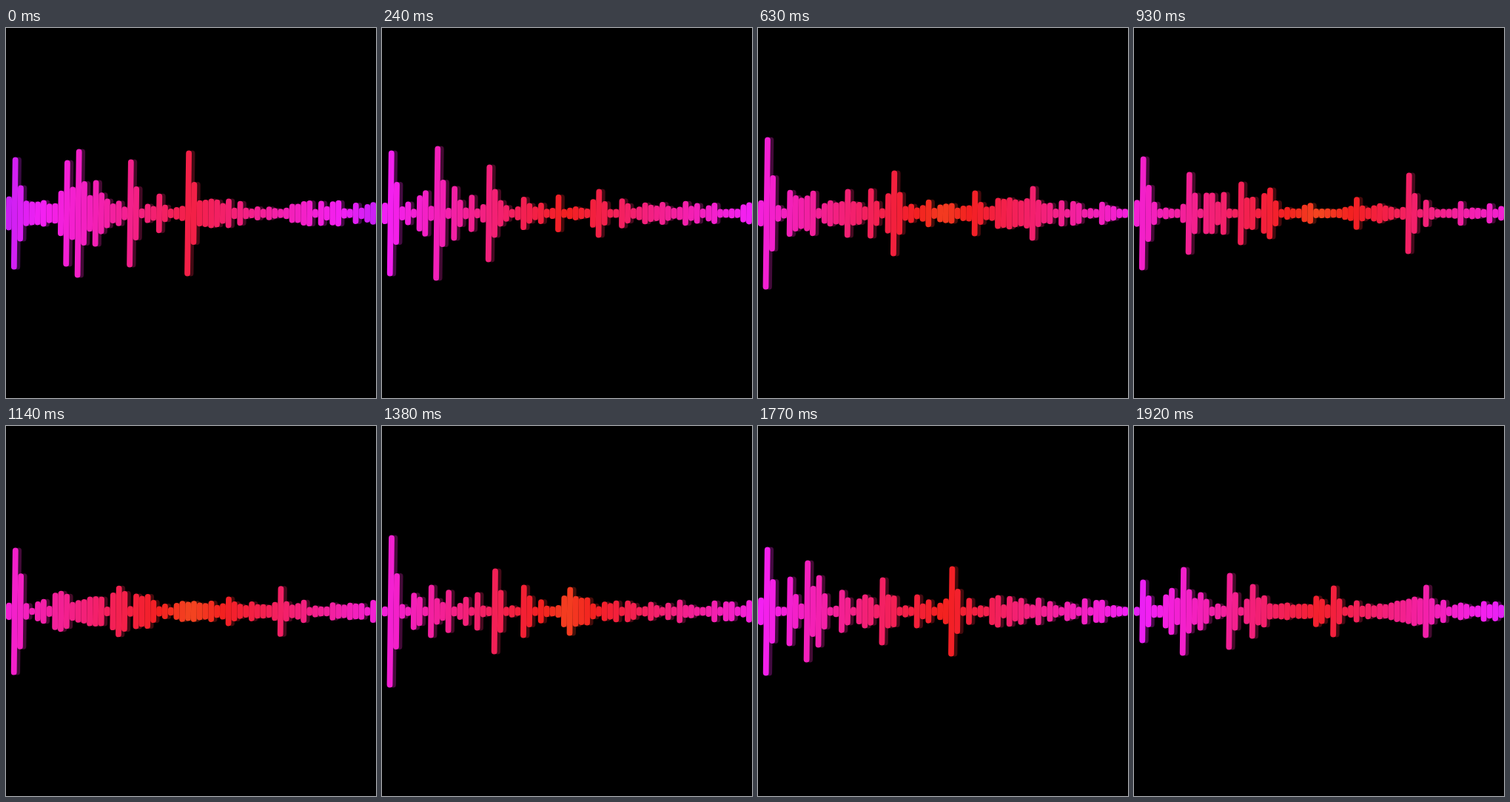
Write an HTML page with a canvas that moves like this. It is 500x500 px and loops after 1950 ms.

```html
<!DOCTYPE html>
<html lang="en">
<head>
<meta charset="utf-8">
<title>Sound bars</title>
<style>
  html, body { margin: 0; width: 100%; height: 100%; overflow: hidden; background: #000; }
  canvas { display: block; width: 100vw; height: 100vh; }
</style>
</head>
<body>
<canvas width="500" height="500"></canvas>
<script>
const ctx = document.querySelector('canvas').getContext('2d');
const LOOP = 1950, STEP = 30, COUNT = 64, PITCH = 500 / COUNT, WIDTH = 7.8, MIDDLE = 250.5;

// Loudest bars at a few moments, as bar: half-height
const keys = [
  { time: 0, peaks: { 1: 76, 10: 72, 12: 87, 15: 45, 21: 73, 31: 85 } },
  { time: 240, peaks: { 1: 85, 9: 91, 12: 37, 18: 66, 37: 33 } },
  { time: 630, peaks: { 1: 103, 15: 33, 19: 34, 23: 58, 37: 31, 47: 37 } },
  { time: 930, peaks: { 1: 77, 9: 56, 18: 43, 23: 35, 47: 55 } },
  { time: 1380, peaks: { 1: 103, 8: 36, 19: 58, 24: 36, 32: 33 } },
  { time: 1770, peaks: { 1: 87, 5: 47, 8: 69, 10: 49, 21: 46, 33: 61 } },
  { time: 1920, peaks: { 1: 43, 8: 60, 16: 52, 20: 37, 34: 35, 50: 36 } }
];

const mix = (a, b, u) => a + (b - a) * u;

function random(i, j) {
  const v = Math.sin(i * 127.1 + j * 311.7 + 7) * 43758.5453;
  return v - Math.floor(v);
}

function noise(i, t) {
  const j = Math.floor(t);
  return mix(random(i, j), random(i, j + 1), t - j) * 2 - 1;
}

// A peak carries half its height over to the next bar; the rest is
// a seeded murmur that gets quieter to the right.
function level(i, k) {
  const { peaks } = keys[k];
  const murmur = 6 + random(i, k) ** 2 * (28 - 0.28 * i);
  return peaks[i] ?? Math.max(murmur, (peaks[i - 1] ?? 0) / 2);
}

function bar(x, h, color) {
  const len = Math.max(h - WIDTH / 2, 0.1), lean = len * 0.0125;
  ctx.strokeStyle = color;
  ctx.beginPath();
  ctx.moveTo(x + lean, MIDDLE - len);
  ctx.lineTo(x - lean, MIDDLE + len);
  ctx.stroke();
}

function draw(now) {
  const t = Math.floor((now % LOOP) / STEP) * STEP;
  const k = Math.min(keys.findLastIndex(key => key.time <= t), keys.length - 2);
  const u = (t - keys[k].time) / (keys[k + 1].time - keys[k].time);
  const sway = 0.4 * Math.sin(Math.PI * u);
  const warmth = 350 + 21 * Math.sin(Math.PI * t / 2050) ** 0.7;

  ctx.fillStyle = '#000';
  ctx.fillRect(0, 0, 500, 500);
  ctx.lineWidth = WIDTH;
  ctx.lineCap = 'round';

  for (let i = 0; i < COUNT; i++) {
    const x = (i + 0.5) * PITCH;
    const h = mix(level(i, k), level(i, k + 1), u) * (1 + sway * noise(i, t / 90));
    const hue = warmth - 62 * Math.abs(x / 250 - 1);
    bar(x + 4.5, h, `hsl(${hue}, 75%, 15%)`);
    bar(x, h, `hsl(${hue}, 90%, 54%)`);
  }
  requestAnimationFrame(draw);
}
requestAnimationFrame(draw);
</script>
</body>
</html>
```
